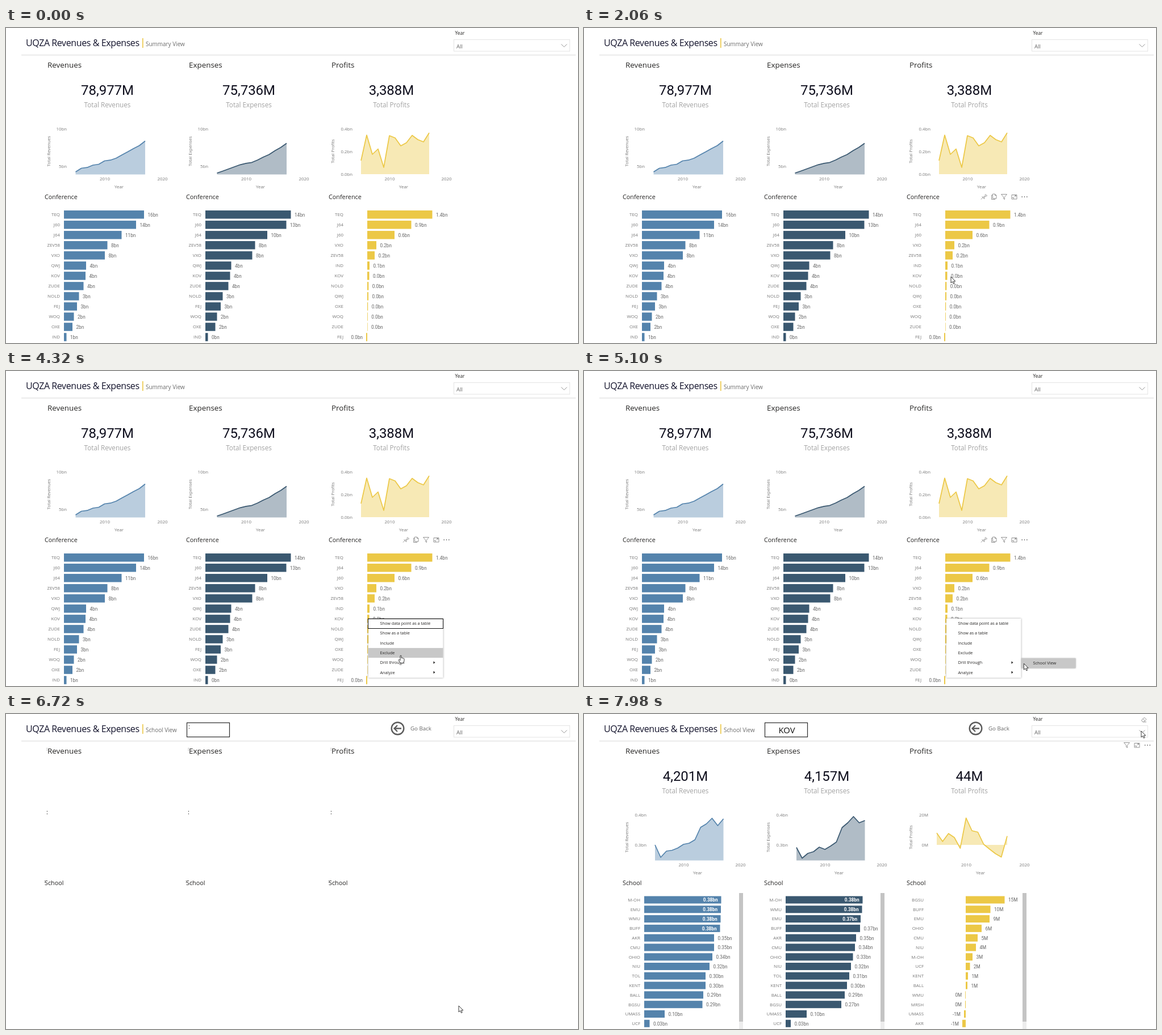
Write an HTML page that moves like this. It is 1007x556 px and loops after 8000 ms.

```html
<!DOCTYPE html>
<html lang="en">
<head>
<meta charset="utf-8">
<title>Revenues and expenses dashboard</title>
<style>
html, body { margin: 0; width: 100%; height: 100%; overflow: hidden; background: #fff; }
svg { display: block; width: 1007px; height: 556px; font-family: "Open Sans", "Noto Sans", sans-serif; }
.din { font-family: Roboto, sans-serif; }
.icon { fill: none; stroke: #8a8a8a; stroke-width: .9; }
</style>
</head>
<body>
<svg id="stage" viewBox="0 0 1007 556"></svg>
<script>
const LOOP = 8000;
const BLUE = '#5483ac', NAVY = '#3a5870', GOLD = '#ecc846';
const GREY = '#777', INK = '#252423';

// y is the middle of the capitals
function text(x, y, str, size, fill = GREY, anchor = 'start', extra = '') {
  return `<text x="${x}" y="${y + size * 0.357}" font-size="${size}" fill="${fill}" text-anchor="${anchor}" ${extra}>${str.replace('&', '&amp;')}</text>`;
}
const rect = (x, y, w, h, fill, extra = '') =>
  `<rect x="${x}" y="${y}" width="${w}" height="${h}" fill="${fill}" ${extra}/>`;
const path = (d, extra = '') => `<path d="${d}" ${extra}/>`;
const group = (id, body, extra = '') => `<g id="${id}" ${extra}>${body}</g>`;

function areaChart({ x0, x1, base, ys }, color) {
  const line = ys.map((y, i) => `${x0 + (x1 - x0) * i / (ys.length - 1)} ${y}`).join('L');
  return path(`M${x0} ${base}L${line}L${x1} ${base}Z`, `fill="${color}" fill-opacity=".4"`) +
    path('M' + line, `fill="none" stroke="${color}" stroke-width="1.7" stroke-linejoin="round"`);
}

function axes({ ticks, tickX, mid, year }, column) {
  const labels = ticks.map(([str, y]) => text(tickX, y, str, 7.8, GREY, 'end')).join('');
  const { side, end, name } = column;
  return labels + text(mid, 266.5, '2010', 7.9, GREY, 'middle') + text(end, 266.5, '2020', 7.9, GREY, 'middle') +
    text(year, 280.5, 'Year', 7.8, GREY, 'middle') +
    text(side, 217.5, 'Total ' + name, 7.7, GREY, 'middle', `transform="rotate(-90 ${side} 217.5)"`);
}

// Each row reads "name length label"; "*" puts the label inside the bar
function barChart({ x, nameX, rows }, color, top, step, height) {
  return rows.split('|').map((row, i) => {
    const [name, length, label] = row.split(' ');
    const w = +length, y = top + step * i, tip = x + w;
    const bar = rect(Math.min(x, tip), y - height / 2, Math.abs(w), height, color);
    const value = label.startsWith('*')
      ? text(tip - 6, y + 0.3, label.slice(1), 8.2, '#fff', 'end', 'class="din" font-weight="700"')
      : text(w < 0 ? tip - 6 : tip + 6.5, y + 0.5, label, 8.2, '#666', w < 0 ? 'end' : 'start', 'class="din"');
    return text(nameX, y, name, 7.9, GREY, 'end') + bar + value;
  }).join('');
}

const columns = [
  { name: 'Revenues', color: BLUE, x: 73, center: 178.5, side: 75.5, end: 275.5, scroll: 273 },
  { name: 'Expenses', color: NAVY, x: 322, center: 427.5, side: 324.5, end: 524.5, scroll: 522 },
  { name: 'Profits', color: GOLD, x: 573, center: 678.5, side: 575.5, end: 775.5, scroll: 772 }
];

const summary = [
  { total: '78,977M', ticks: [['10bn', 178], ['5bn', 244.5]], tickX: 107, mid: 174, year: 199,
    area: { x0: 122.5, x1: 245, base: 258.5, ys: [254, 247.5, 246.2, 242, 240.5, 234.5, 233.2, 229.7, 224, 218.5, 212.7, 207.5, 199.5] },
    bars: { x: 102, nameX: 95, rows: 'TEQ 141 16bn|J60 127 14bn|J64 101.5 11bn|ZEV58 76.5 8bn|VXO 72 8bn|QWJ 39 4bn|KOV 38 4bn|ZUDE 34.5 4bn|NOLD 26.5 3bn|FEJ 23 3bn|WOQ 17.5 2bn|OXE 15 2bn|IND 4.5 1bn' } },
  { total: '75,736M', ticks: [['10bn', 178], ['5bn', 244.5]], tickX: 356, mid: 423, year: 448,
    area: { x0: 371.5, x1: 494, base: 258.5, ys: [256, 252.5, 248.8, 245, 241.3, 238.8, 237.3, 233, 227.8, 223.2, 216.5, 210.7, 203.5] },
    bars: { x: 351, nameX: 344, rows: 'TEQ 150.5 14bn|J60 142.5 13bn|J64 109 10bn|ZEV58 87.5 8bn|VXO 82.5 8bn|QWJ 45.5 4bn|KOV 43.5 4bn|ZUDE 40.5 4bn|NOLD 30.5 3bn|FEJ 27 3bn|WOQ 20.5 2bn|OXE 17.5 2bn|IND 4.5 0bn' } },
  { total: '3,388M', ticks: [['0.4bn', 178], ['0.2bn', 218], ['0.0bn', 258]], tickX: 610, mid: 675.5, year: 700,
    area: { x0: 625, x1: 745, base: 258, ys: [234, 189, 223, 213.5, 246, 190, 194, 208, 202.5, 189.5, 197, 201, 185] },
    bars: { x: 636, nameX: 594, rows: 'TEQ 114.5 1.4bn|J64 77.5 0.9bn|J60 48 0.6bn|VXO 16 0.2bn|ZEV58 13 0.2bn|IND 4 0.1bn|KOV 3.5 0.0bn|NOLD 2.3 0.0bn|QWJ 2 0.0bn|OXE 1.2 0.0bn|WOQ .8 0.0bn|ZUDE .6 0.0bn|FEJ -2 0.0bn' } }
];

const school = [
  { total: '4,201M', ticks: [['0.4bn', 178], ['0.3bn', 231]], tickX: 110, mid: 175.5, year: 200,
    area: { x0: 125, x1: 245.5, base: 258.5, ys: [231, 253, 242, 240.5, 236.5, 230, 228, 222, 200, 194, 184, 197, 185] },
    bars: { x: 106, nameX: 99, rows: 'M-OH 135.5 *0.38bn|EMU 135 *0.38bn|WMU 134.5 *0.38bn|BUFF 133.5 *0.38bn|AKR 123 0.35bn|CMU 123 0.35bn|OHIO 120 0.34bn|NIU 115 0.32bn|TOL 108 0.30bn|KENT 108 0.30bn|BALL 104 0.29bn|BGSU 102.5 0.29bn|UMASS 36 0.10bn|UCF 9.5 0.03bn' } },
  { total: '4,157M', ticks: [['0.4bn', 178], ['0.3bn', 231]], tickX: 359, mid: 424.5, year: 449,
    area: { x0: 374, x1: 494.5, base: 258.5, ys: [235.5, 254.5, 246, 243, 235, 239, 233, 226, 200.5, 192, 181, 192, 188] },
    bars: { x: 355, nameX: 348, rows: 'M-OH 135.5 *0.38bn|WMU 134.5 *0.38bn|EMU 132 *0.37bn|BUFF 131 0.37bn|AKR 124 0.35bn|CMU 122 0.34bn|OHIO 118.5 0.33bn|NIU 115 0.32bn|TOL 112 0.31bn|KENT 108 0.30bn|BALL 104 0.29bn|BGSU 98 0.27bn|UMASS 37 0.10bn|UCF 9 0.03bn' } },
  { total: '44M', ticks: [['20M', 178], ['0M', 231]], tickX: 606, mid: 673, year: 698,
    area: { x0: 621, x1: 745, base: 231, ys: [210, 225, 211, 218, 237, 183.5, 206, 208.5, 230, 238.5, 246.5, 252.5, 215.5] },
    bars: { x: 672, nameX: 598, rows: 'BGSU 68.5 15M|BUFF 43.5 10M|EMU 42 9M|OHIO 28 6M|CMU 21 5M|NIU 18 4M|M-OH 12 3M|UCF 7.5 2M|KENT 4 1M|BALL 3 1M|WMU -.8 0M|MRSH -1 0M|UMASS -3 -1M|AKR -6 -1M' } }
];

const panels = (data, top, step, height) => data.map((d, i) => {
  const c = columns[i];
  return text(c.center, 109.5, d.total, 24, '#0d0d1c', 'middle', 'class="din"') +
    text(c.center, 136, 'Total ' + c.name, 11.7, '#a3a3a3', 'middle') +
    axes(d, c) + areaChart(d.area, c.color) + barChart(d.bars, c.color, top, step, height);
}).join('');

const listTitles = str => columns.map(c => text(c.x - 5, 298, str, 10.8, INK)).join('');
const scrollbars = columns.map(c =>
  rect(c.scroll, 316, 7, 240, '#ededed') + rect(c.scroll, 316, 7, 227, '#c4c4c4')).join('');
const loadingMarks = columns.map(c =>
  text(c.x - 2, 61, ':', 8, INK) + text(c.x - 2, 173, ':', 11, INK) + text(c.x - 6, 295, ':', 8, INK)).join('') +
  text(321, 22, ':', 11, INK);

const header = text(35, 26, 'UQZA Revenues & Expenses', 16, '#12122b', 'start', 'letter-spacing="-.4"') +
  rect(240, 18, 1.6, 17, GOLD) +
  text(790.5, 9, 'Year', 8.3, INK) +
  rect(788.5, 20.5, 204, 20.5, '#fff', 'stroke="#e4e4e4"') +
  text(793, 32.5, 'All', 9.6, '#666') +
  path('M977.5 28.5l5 5 5-5', 'class="icon"') +
  columns.map(c => text(c.x, 65, c.name, 13.4, INK)).join('');

const schoolHeader = text(246, 28, 'School View', 9.9, '#6b6b6b') +
  rect(318.5, 15.5, 75, 25, '#fff', 'stroke="#2b2b2b" stroke-width="1.2"') +
  '<circle cx="689.5" cy="25.5" r="10.8" fill="none" stroke="#5c5c5c" stroke-width="2.4"/>' +
  path('M696 25.5H684M689 20l-5.5 5.5 5.5 5.5', 'fill="none" stroke="#5c5c5c" stroke-width="2.3"') +
  text(712, 26, 'Go Back', 9.7, '#666');

const funnel = (x, y) => path(`M${x - 5} ${y - 4.5}h10l-4 4.8v4.2l-2-1.3v-2.9z`, 'class="icon"');
const focusIcon = (x, y) => path(`M${x - 4.5} ${y - 3.5}h9v7.5h-9zM${x} ${y}l3-2.5m-2.2 0h2.2v2M${x - 4} ${y + 1.5}h3v2`, 'class="icon"');
const dots = (x, y) => [-4.3, 0, 4.3].map(d => `<circle cx="${x + d}" cy="${y}" r=".9" fill="#777"/>`).join('');

const chartIcons = path('M699 302.5l3-3M700.5 297.5l4 4M701.5 298.5l3-.5 2-2.5-.5-1 1-1 2.5 2.5-1 1-1-.3-2.5 2-.4 3', 'class="icon"') +
  path('M719.5 294.5v-1.5h4l2.5 2.5v5.5h-6.5zM719.5 295h-2v7.5h6v-1.5M723.5 293v2.5h2.5', 'class="icon"') +
  funnel(739.5, 298) + focusIcon(757.5, 298) + dots(775.5, 298);
const slicerIcons = path('M981.5 11l5-5 3.5 3.5-4.5 4.5h-2zM984 8.5l3.5 3.5M985 14h5', 'class="icon"') +
  funnel(955.5, 55) + focusIcon(973.5, 55) + dots(992, 55);

const ROW = 17.3, MENU_TOP = 437;
const menu = rect(638, MENU_TOP, 131.5, 104.5, '#fff', 'style="filter:drop-shadow(0 0 1.5px #0006)"') +
  rect(638, MENU_TOP, 131.5, ROW, '#c8c8c8', 'id="hover"') +
  ['Show data point as a table', 'Show as a table', 'Include', 'Exclude', 'Drill through', 'Analyze']
    .map((str, i) => text(658.5, MENU_TOP + 8.5 + ROW * i, str, 7.25, INK)).join('') +
  [4, 5].map(i => path(`M752.5 ${MENU_TOP + 6 + ROW * i}l3 2.4-3 2.4z`, `fill="${INK}"`)).join('') +
  rect(637.5, 437.5, 132, 17, 'none', 'id="focusRing" stroke="#111"');
const submenu = rect(770, 507, 95.5, 17.5, '#fff', 'id="submenuBox" style="filter:drop-shadow(0 0 1px #0005)"') +
  text(790.5, 515.5, 'School View', 7.4, INK);

const arrow = path('M0 0V11L2.6 8.7 4.4 12.6 6.2 11.8 4.5 8H7.8Z', 'fill="#fff" stroke="#222" stroke-width=".9"');
const hand = path('M-1 7V.8Q0-.6 1 .8V4.6Q2 3.8 2.8 5 4 4.3 4.6 5.4 6 5 6 6.5V9.5L4.8 13.5H-.5L-4 8.6Q-3.6 6.8-2.2 7.8L-1 9Z',
  'fill="#fff" stroke="#222" stroke-width=".9"');

document.getElementById('stage').innerHTML =
  rect(0, 0, 1007, 556, '#fff') + rect(27, 46.5, 976, 2.5, '#eeeeee') +
  group('header', header) +
  group('summary', text(246, 28, 'Summary View', 9.95, '#6b6b6b') + listTitles('Conference') + panels(summary, 329.3, 18.02, 14.5)) +
  group('schoolPage', schoolHeader + listTitles('School')) +
  group('loading', loadingMarks) +
  group('schoolData', text(357, 29, 'KOV', 14.8, '#111', 'middle') + panels(school, 328, 16.79, 13) + scrollbars) +
  group('chartIcons', chartIcons) + group('slicerIcons', slicerIcons) +
  group('status', path('M0 549H179Q182 549 182 552V556H0Z', 'fill="#f1f3f4"')) +
  group('menu', menu) + group('submenu', submenu) +
  group('click', '<circle cx="637" cy="437" r="7.5" fill="#888" fill-opacity=".35"/>') +
  group('cursor', group('arrow', arrow) + group('hand', hand));

const el = id => document.getElementById(id);
const show = (id, on) => { el(id).style.display = on ? '' : 'none'; };
const ease = p => p * p * (3 - 2 * p);

// The pointer moves in visible steps along each polyline of stops
const moves = [
  { from: 510, to: 580, steps: 2, stops: [[982, 556], [994, 549]] },
  { from: 1270, to: 2060, steps: 11, stops: [[994, 549], [646, 439]] },
  { from: 2140, to: 2920, steps: 11, stops: [[646, 439], [649, 429], [638, 437]] },
  { from: 4080, to: 4540, steps: 7, stops: [[638, 437], [691, 497], [710, 520]] },
  { from: 4870, to: 5240, steps: 6, stops: [[710, 520], [797, 515]] },
  { from: 7190, to: 7980, steps: 11, stops: [[797, 515], [981, 30]] }
];

function pointer(t) {
  const move = moves.filter(m => t >= m.from).pop() || moves[0];
  const { from, to, steps, stops } = move;
  const step = Math.floor((t - from) / (to - from) * (steps - 1) + 1e-6) + 1;
  const p = ease(Math.min(1, Math.max(0, step / steps))) * (stops.length - 1);
  const i = Math.min(Math.floor(p), stops.length - 2), f = p - i;
  return [0, 1].map(k => stops[i][k] + (stops[i + 1][k] - stops[i][k]) * f);
}

function statusOpacity(t) {
  if (t < 5490 || t >= 6340) return 0;
  if (t < 5560) return 0.5;
  if (t < 5810) return 1;
  return t < 5885 ? 0.75 : t < 5960 ? 0.5 : 0.3;
}

function render(t) {
  const [x, y] = pointer(t);
  const onSummary = t < 6340, onSchool = t >= 6490;
  const menuOpen = t >= 3780 && onSummary;
  const row = Math.floor((y - MENU_TOP) / ROW);

  show('header', onSummary || onSchool);
  show('summary', onSummary);
  show('schoolPage', onSchool);
  show('loading', onSchool && t < 6820);
  show('schoolData', t >= 6820);
  show('chartIcons', onSummary && t >= 1270 && x < 790 || menuOpen);
  show('slicerIcons', t >= 7190 && y < 62);

  show('menu', menuOpen);
  show('hover', t >= 4080 && x < 770);
  el('hover').setAttribute('y', MENU_TOP + ROW * row);
  show('focusRing', t >= 3930 && t < 4400);
  show('submenu', t >= 4470 && onSummary);
  el('submenuBox').setAttribute('fill', x >= 770 ? '#c8c8c8' : '#fff');
  show('click', t >= 3170 && t < 3320);
  el('status').setAttribute('opacity', statusOpacity(t));

  const overMenu = menuOpen && t >= 4080 && x < 770;
  show('cursor', t >= 510);
  show('arrow', !overMenu);
  show('hand', overMenu);
  el('cursor').setAttribute('transform', `translate(${x.toFixed(1)} ${y.toFixed(1)})`);
}

const start = performance.now();
function tick() {
  render((performance.now() - start) % LOOP);
  requestAnimationFrame(tick);
}
tick();
</script>
</body>
</html>
```
